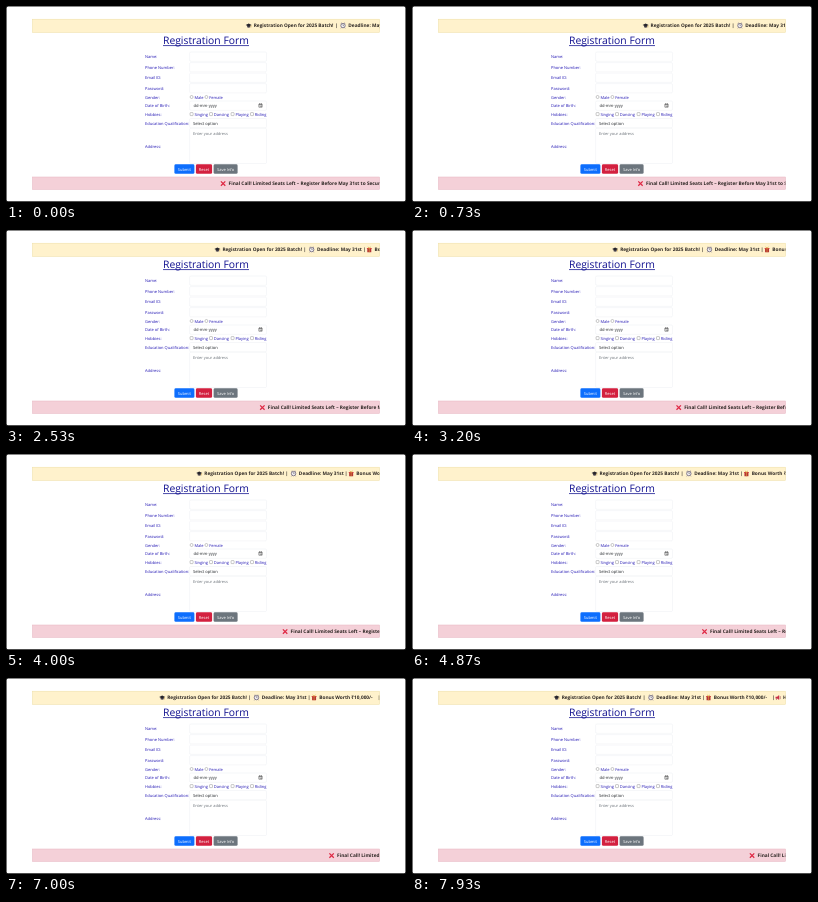
Animation of 400 by 196 pixels, one loop 8 s. Source, as an HTML page:

```html
<!DOCTYPE html>
<html lang="en">
<head>
<meta charset="utf-8">
<title>Registration Form</title>
<style>
  html, body { margin: 0; width: 100%; height: 100%; overflow: hidden; background: #fff; }
  svg { display: block; width: 100vw; height: 100vh; }
  text { font: 4px "Open Sans", "Noto Sans", sans-serif; text-rendering: geometricPrecision; }
  .label { fill: #2418b4; }
  .value { fill: #212529; font-size: 4.1px; }
  .hint { fill: #686f76; font-size: 3.95px; }
  .title { fill: #10108f; font-size: 10.35px; }
  .button { fill: #fff; text-anchor: middle; }
  .banner text { fill: #2b2522; font-size: 4.78px; font-weight: 700; }
  .field { fill: #fff; stroke: #e6e8ec; stroke-width: .35; }
  .tick { fill: #fff; stroke: #777; stroke-width: .4; }
</style>
</head>
<body>
<svg viewBox="0 0 400 196">
  <defs>
    <clipPath id="strip"><rect x="26.5" y="0" width="347" height="196"/></clipPath>
  </defs>
  <rect width="400" height="196" fill="#111"/>
  <rect x=".6" y=".4" width="398.8" height="194.8" rx="1.5" fill="#fff"/>

  <rect x="26.5" y="13.2" width="347" height="13.2" fill="#fff2cc" stroke="#eedda2" stroke-width=".5"/>
  <rect x="26.5" y="171" width="347" height="12.4" fill="#f4d0d8" stroke="#e5b4c0" stroke-width=".5"/>

  <text class="title" x="157" y="38">Registration Form</text>
  <rect x="157" y="39.3" width="86" height=".75" fill="#10108f"/>
  <g id="form"></g>

  <g class="banner" clip-path="url(#strip)">
    <g id="notice">
      <g transform="translate(2.7 19.6)">
        <path d="M-1.6 0V1.7Q0 2.6 1.6 1.7V0Z" fill="#4a4550"/>
        <path d="M-3-.5 0-2 3-.5 0 1Z" fill="#26242b"/>
        <path d="M2.3-.3V1.8" stroke="#c99a35" stroke-width=".5"/>
      </g>
      <g transform="translate(97 19.6)">
        <path d="M-2.2-2.2-1.2-2.6M2.2-2.2 1.2-2.6M-1.6 2-2.1 2.7M1.6 2 2.1 2.7" stroke="#67617a" stroke-width=".7"/>
        <circle r="2.2" fill="#f3f0f4" stroke="#67617a" stroke-width=".8"/>
        <path d="M0-1.4V0H1" fill="none" stroke="#444" stroke-width=".45"/>
      </g>
      <g transform="translate(154.6 19.6)">
        <path d="M-2-.7H2V2.7H-2Z" fill="#b63334"/>
        <path d="M-2.4-1.7H2.4V-.5H-2.4Z" fill="#d0423e"/>
        <path d="M0-1.7V2.7M0-1.7-1.5-2.6M0-1.7 1.5-2.6" stroke="#d8a13c" stroke-width=".7"/>
      </g>
      <g transform="translate(224 19.6)">
        <path d="M-2.4-.8H-.8L1.2-2.5V2.5L-.8 .9H-2.4Z" fill="#cb3048"/>
        <path d="M-1.5 .8V2.3M2.2-1.5V1.5" stroke="#8f3544" stroke-width=".6"/>
      </g>
    </g>
    <g id="finalCall">
      <path d="M.7 175.4 5.1 179.8M5.1 175.4 .7 179.8" stroke="#df2945" stroke-width="1.3"/>
    </g>
  </g>
</svg>
<script>
const byId = id => document.getElementById(id);

function add(parent, tag, attributes, content = "") {
  const node = document.createElementNS("http://www.w3.org/2000/svg", tag);
  for (const name in attributes) node.setAttribute(name, attributes[name]);
  node.textContent = content;
  parent.append(node);
  return node;
}

const form = byId("form"), notice = byId("notice"), finalCall = byId("finalCall");
const write = (kind, x, y, content) => add(form, "text", { class: kind, x, y }, content);
const field = (y, height = 9.3) =>
  add(form, "rect", { class: "field", x: 183.6, y, width: 76.9, height, rx: 1.2 });

[["Name:", 52], ["Phone Number:", 62.9], ["Email ID:", 73.3], ["Password:", 83.8],
 ["Gender:", 92.5], ["Date of Birth:", 101], ["Hobbies:", 109.6],
 ["Education Qualification:", 118.5], ["Address:", 141.6]]
  .forEach(([name, y]) => write("label", 139, y, name));

[46, 56.6, 67.1, 77.6, 95, 112.5].forEach(y => field(y));
field(122.3, 35.2);

function choices(y, radius, options) {
  for (const [name, x] of options) {
    add(form, "rect", { class: "tick", x: x - 1.5, y: y - 1.5, width: 3, height: 3, rx: radius });
    write("label", x + 2.8, y + 1.5, name);
  }
}
choices(91, 1.5, [["Male", 185.6], ["Female", 200.4]]);
choices(108.1, .5, [["Singing", 185.6], ["Dancing", 205], ["Playing", 226.6], ["Riding", 246]]);

write("value", 187.4, 101.1, "dd-mm-yyyy");
write("value", 187, 118.6, "Select option");
write("hint", 187, 128.6, "Enter your address");

// Calendar icon
add(form, "path", { d: "M252.9 98.1H256.1V101.2H252.9ZM252.9 98.7H256.1M253.6 97.3V98M255.4 97.3V98",
  fill: "none", stroke: "#333", "stroke-width": .5 });
add(form, "rect", { x: 254.5, y: 99.7, width: 1, height: 1, fill: "#333" });

[["Submit", 168.4, 20, "#0d6efd"], ["Reset", 189.9, 16.2, "#d3203f"], ["Save Info", 207.6, 24, "#6c757d"]]
  .forEach(([name, x, width, fill]) => {
    add(form, "rect", { x, y: 158.3, width, height: 9.5, rx: 1.4, fill });
    write("button", x + width / 2, 164.6, name);
  });

[["Registration Open for 2025 Batch!", 7.7], ["|", 88.9], ["Deadline: May 31st", 102.3],
 ["|", 148.3], ["Bonus Worth ₹10,000/-", 159.8], ["|", 218.4], ["Hurry", 229]]
  .forEach(([content, x]) => add(notice, "text", { x, y: 21.4 }, content));
add(finalCall, "text", { x: 8.4, y: 179.3 },
  "Final Call! Limited Seats Left – Register Before May 31st to Secure Your Spot!");

const LOOP = 8000, STEPS_PER_SECOND = 15;

function draw(now) {
  const step = Math.floor(((now % LOOP) + 5) * STEPS_PER_SECOND / 1000);
  const seconds = Math.min(step, 119) / STEPS_PER_SECOND;
  notice.setAttribute("transform", `translate(${240 - 12.36 * seconds} 0)`);
  finalCall.setAttribute("transform", `translate(${214.2 + 15.5 * seconds} 0)`);
  requestAnimationFrame(draw);
}
draw(0);
</script>
</body>
</html>
```
